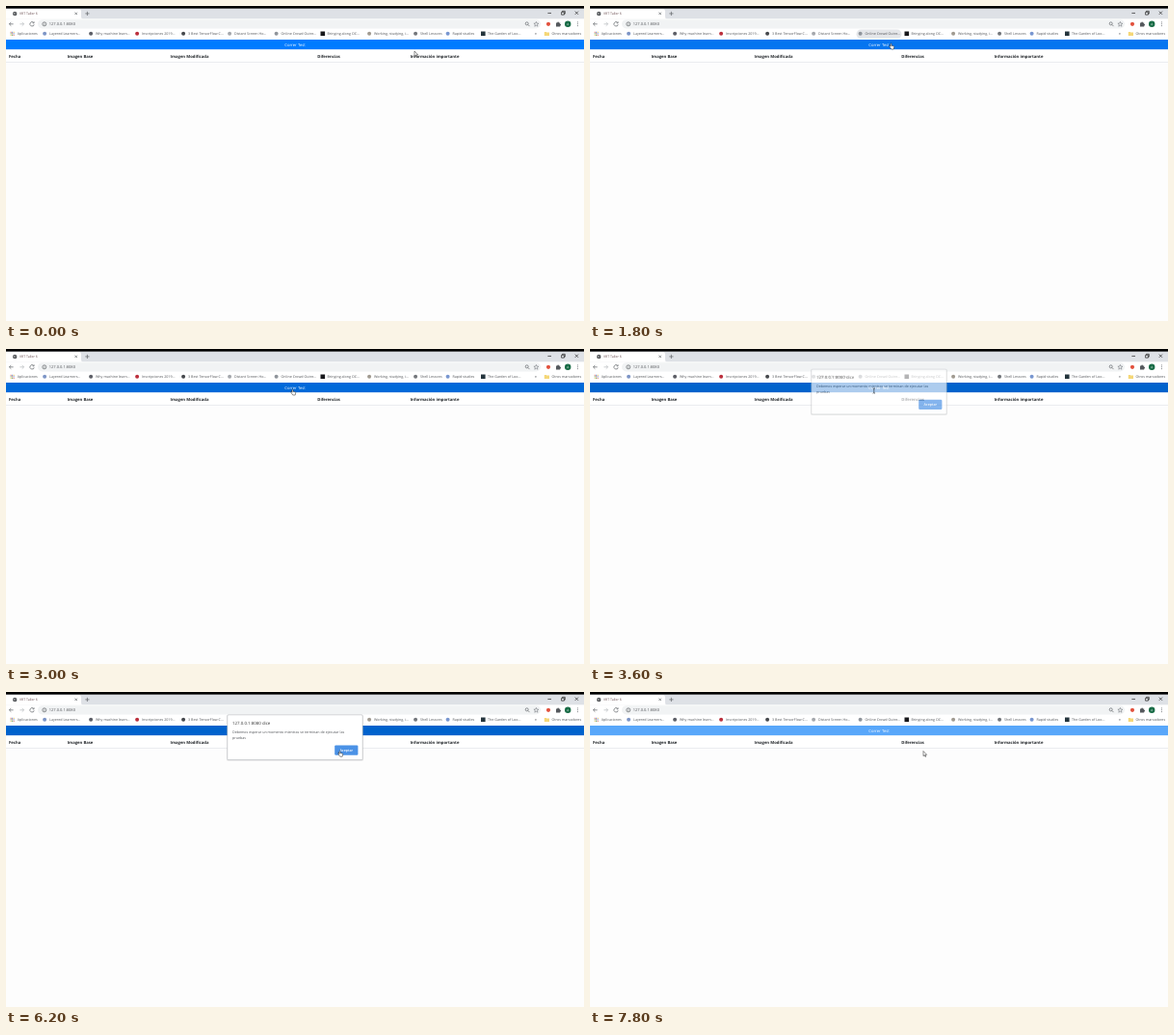
An HTML page that plays this animation: 600 px wide and 328 px high, repeating every 8000 ms.

```html
<!DOCTYPE html>
<html lang="es">
<head>
<meta charset="utf-8">
<title>VRT Taller 6</title>
<style>
  html, body { margin: 0; width: 100%; height: 100%; overflow: hidden; background: #fdfdfd; }
  svg { display: block; width: 100%; height: 100%; }
  text { font-family: "Open Sans", "Noto Sans", sans-serif; font-size: 3.65px; fill: #505357; text-rendering: geometricPrecision; }
  .head text { font-size: 4.2px; font-weight: 700; fill: #212529; }
  .line { fill: none; stroke: #5f6368; stroke-width: .7; }
</style>
</head>
<body>
<svg viewBox="0 0 600 328">
  <rect width="600" height="328" fill="#fdfdfd"/>
  <rect width="600" height="14" fill="#dee1e6"/>
  <rect width="600" height="2.6" fill="#000"/>
  <path d="M0 13.5V3H75.5Q78 3 78 5.5V11Q78 13.5 80 13.5Z" fill="#fff"/>
  <rect y="13.3" width="600" height="21.7" fill="#fff"/>

  <g id="globe">
    <circle cx="9.2" cy="7.9" r="2.2" fill="#4b4e52"/>
    <path d="M7.7 7.2l1.5.5-.3 1.4M9.6 6.2l1 .9" fill="none" stroke="#fff" stroke-width=".5"/>
  </g>
  <text x="14" y="9.3" style="font-size:3.5px;fill:#65484b">VRT Taller 6</text>
  <path class="line" d="M71.5 6.6l2.4 2.4m0-2.4l-2.4 2.4M84.4 5.8v4.2M82.3 7.9h4.2"/>
  <path class="line" style="stroke:#222" d="M562.4 7.4h3.6M576.6 6.3h2.8v2.8h-2.8zM577.5 6.2v-.9h2.8v2.8h-.8M590.8 5.6l3.2 3.2m0-3.2l-3.2 3.2"/>

  <rect x="33" y="14.2" width="522" height="9.2" rx="4.6" fill="#f1f3f4"/>
  <path class="line" d="M7.6 18.8H3.4m1.9-1.9l-1.9 1.9 1.9 1.9M28.7 17.3a2.2 2.2 0 1 0 .5 1.9M29.1 16.3v1.5h-1.5"/>
  <path class="line" style="stroke:#b5b8bc" d="M14.4 18.8h4.2m-1.9-1.9l1.9 1.9-1.9 1.9"/>
  <circle class="line" cx="39.8" cy="18.8" r="2"/>
  <path class="line" d="M39.8 18.5v1.3M39.8 17.5v.4"/>
  <text x="44.8" y="20.3" style="font-size:4px">127.0.0.1:8080</text>
  <circle class="line" cx="540.7" cy="18.3" r="1.5"/>
  <path class="line" d="M541.8 19.4l1.7 1.7"/>
  <path class="line" style="stroke-width:.5" d="M550.4 16.4l.7 1.7 1.8.1-1.4 1.2.5 1.8-1.6-1-1.6 1 .5-1.8-1.4-1.2 1.8-.1z"/>
  <circle cx="563" cy="18.8" r="2.1" fill="#e2513d"/>
  <path d="M571 17.4h1.2a.9.9 0 0 1 1.8 0h1.2v1.3a.9.9 0 0 1 0 1.8v1H571z" fill="#55595d"/>
  <circle cx="583.2" cy="18.8" r="3.2" fill="#176b45"/>
  <text x="583.2" y="20" text-anchor="middle" style="font-size:3.2px;fill:#fff">A</text>
  <path d="M593.4 16.9v.01M593.4 18.8v.01M593.4 20.7v.01" stroke="#5f6368" stroke-width="1" stroke-linecap="round"/>

  <rect id="hover" x="276.5" y="24.6" width="47" height="9.2" rx="4.6" fill="#e4e6e9"/>
  <g id="bookmarks"></g>
  <text x="548.8" y="30.2" style="font-size:4.4px">»</text>
  <path d="M558.8 26.9h2l.6.7h2.6v3.5h-5.2z" fill="#f5d778"/>

  <rect id="bar" y="35" width="600" height="10.4"/>
  <text x="300" y="41.7" text-anchor="middle" style="font-size:4.2px;fill:#fff">Correr Test</text>
  <rect y="45.4" width="600" height="12.6" fill="#fff"/>
  <rect y="58" width="600" height=".6" fill="#dee2e6"/>
  <g id="head" class="head"></g>

  <g id="dialog">
    <rect x="229" y="23.8" width="142" height="48" rx="1.6" fill="#000" opacity=".1"/>
    <rect x="229.8" y="23.8" width="140.4" height="46.8" rx="1.2" fill="#fff" stroke="#b9bcc0" stroke-width=".6"/>
    <text x="235" y="33.6" style="font-size:4.4px;fill:#333">127.0.0.1:8080 dice</text>
    <text x="235" y="42.6" fill="#666">Debemos esperar un momento mientras se terminan de ejecutar las</text>
    <text x="235" y="48.8" fill="#666">pruebas</text>
    <rect x="341.2" y="55.4" width="24.2" height="10.3" rx="1.2" fill="#4b92e6"/>
    <text x="353.3" y="61.9" text-anchor="middle" style="fill:#fff;font-weight:600">Aceptar</text>
  </g>

  <g id="cursor" stroke-linejoin="round">
    <path id="arrow" d="M0 0V5.2L1.2 4.1 2 6 2.8 5.6 2 3.8H3.6Z" fill="#fff" stroke="#222" stroke-width=".5"/>
    <path id="beam" d="M-1.2-2.7Q0-2.7 0-2V2Q0 2.7-1.2 2.7M1.2-2.7Q0-2.7 0-2M0 2Q0 2.7 1.2 2.7" fill="none" stroke="#26303c" stroke-width=".65"/>
    <path id="hand" d="M0 .4Q.5-.4 1 .4V2.3L3.3 2.8Q3.8 3 3.7 3.7L3.2 6H.8L-.9 3.7Q-1-.1 0 3.2Z" fill="#fff" stroke="#222" stroke-width=".5"/>
  </g>
</svg>
<script>
const LOOP = 8000, STEP = 200;
const $ = id => document.getElementById(id);

function add(parent, tag, attrs, label = "") {
  const node = document.createElementNS(parent.namespaceURI, tag);
  for (const name in attrs) node.setAttribute(name, attrs[name]);
  node.textContent = label;
  parent.append(node);
}

// text x, label, icon colour
const bookmarks = [
  [45, "Layered Learners...", "#7d95c6"],
  [93, "Why machine learn...", "#5c5e66"],
  [141, "Inscripciones 2019...", "#bb2f3c"],
  [189, "3 Best TensorFlow C...", "#45484c"],
  [237, "Distant Screen Ho...", "#a5a8ad"],
  [285.5, "Online Crowd Outre...", "#8f949b"],
  [333.5, "Bringing along OC...", "#17171b", true],
  [382, "Working, studying, i...", "#a09a90"],
  [430, "Shell Lessons", "#73767b"],
  [463.5, "Rapid studies", "#7896d0"],
  [500, "The Garden of Loo...", "#24343c", true]
];
const row = $("bookmarks");
for (let i = 0; i < 9; i++) {
  add(row, "rect", {
    x: 4.6 + i % 3 * 1.5, y: 26.8 + Math.floor(i / 3) * 1.5, width: 1, height: 1,
    fill: ["#dc5a4b", "#4d8ae0", "#e5b33c", "#4ca565"][i % 4]
  });
}
for (const [x, label, fill, square] of bookmarks) {
  if (square) add(row, "rect", { x: x - 7, y: 26.5, width: 4.6, height: 4.6, fill });
  else add(row, "circle", { cx: x - 4.9, cy: 28.8, r: 2, fill });
  add(row, "text", { x, y: 30.2 }, label);
}
add(row, "text", { x: 11.8, y: 30.2 }, "Aplicaciones");
add(row, "text", { x: 566.5, y: 30.2 }, "Otros marcadores");

const columns = [[3, "Fecha"], [63.7, "Imagen Base"], [170.5, "Imagen Modificada"],
  [323.3, "Diferencias"], [419.7, "Información importante"]];
for (const [x, label] of columns) add($("head"), "text", { x, y: 53.7 }, label);

// time, x, y, shape
const path = [
  [0, 424, 47, "arrow"], [200, 410, 46, "beam"], [400, 372, 41, "hand"],
  [600, 335, 36, "hand"], [800, 321.3, 10.5, "beam"], [1000, 321, 7, "arrow"],
  [1400, 319, 8, "arrow"], [1600, 315, 27, "arrow"], [1800, 312, 39, "hand"],
  [2000, 310, 50, "arrow"], [2200, 308.4, 60.3, "arrow"], [2600, 307, 58, "arrow"],
  [3000, 297, 42, "hand"], [3600, 294.8, 43.5, "beam"], [4800, 300, 44, "arrow"],
  [5800, 346, 61, "hand"], [6600, 346, 61.5, "arrow"], [LOOP, 346, 61.5, "arrow"]
];
const barColors = [[0, "#007bff"], [400, "#0069d9"], [1000, "#007bff"], [1800, "#0575f0"],
  [2000, "#0069d9"], [2200, "#007bff"], [3000, "#0069d9"], [3400, "#0062cc"], [6600, "#59a7fa"]];

const lastBefore = (table, t) => table.findLastIndex(key => key[0] <= t);

function draw(t) {
  const i = lastBefore(path, t);
  const [t0, x0, y0, shape] = path[i];
  const [t1, x1, y1] = path[i + 1];
  const k = (t - t0) / (t1 - t0);
  $("cursor").setAttribute("transform", `translate(${x0 + (x1 - x0) * k} ${y0 + (y1 - y0) * k})`);
  for (const id of ["arrow", "beam", "hand"]) $(id).style.display = id === shape ? "" : "none";

  $("bar").setAttribute("fill", barColors[lastBefore(barColors, t)][1]);
  $("hover").style.opacity = t === 1600 || t === 1800 ? 1 : 0;

  const opening = t < 3800;
  $("dialog").style.opacity = t < 3600 || t >= 6600 ? 0 : opening ? .68 : 1;
  $("dialog").setAttribute("transform", `translate(0 ${opening ? -2.7 : 0})`);
}

const start = performance.now();
function tick(now) {
  const t = Math.max(0, now - start) % LOOP;
  draw(Math.floor(t / STEP) * STEP);
  requestAnimationFrame(tick);
}
draw(0);
requestAnimationFrame(tick);
</script>
</body>
</html>
```
